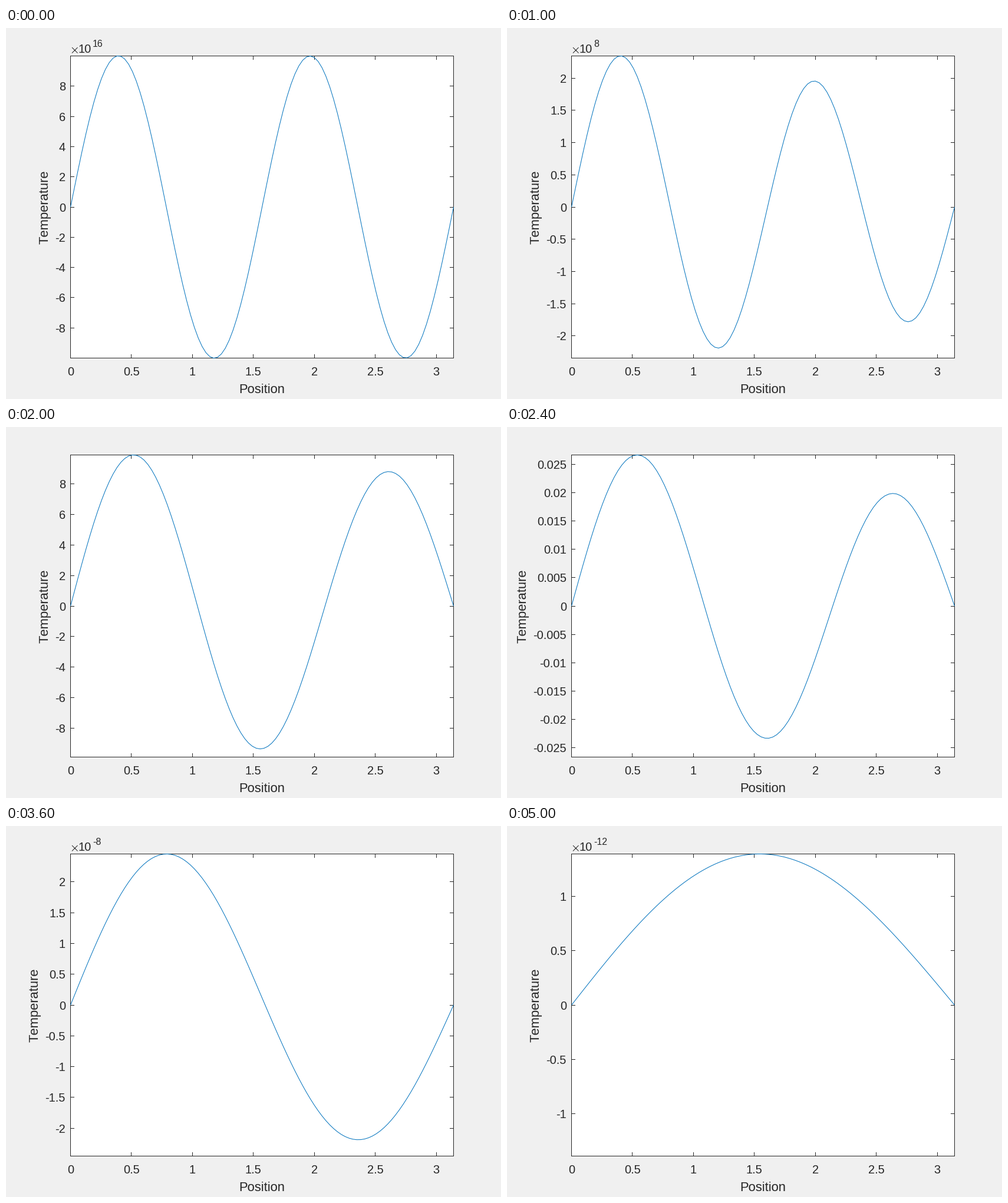
Animation of 840 by 630 pixels, one loop 5100 ms. Source, as a matplotlib script:

```python
import math

import numpy as np
import matplotlib.pyplot as plt
from matplotlib.animation import FuncAnimation
from matplotlib.patches import Rectangle

W, H, DPI = 840, 630, 120
FRAMES, INTERVAL = 51, 100
LEFT, RIGHT, TOP, BOTTOM = 109.5, 759.5, 47.5, 560.5
MID = (TOP + BOTTOM) / 2
TICK = 6.5
MAX_TICKS = 11
INK, BLUE, BACK = "#262626", "#0072BD", "#F0F0F0"

# Mode number -> starting amplitude of sin(n x); each decays as exp(-n t)
MODES = {4: 1e17, 3: 1e14, 2: 1e8, 1: 0.1}
POS = np.linspace(0, math.pi, 100)

plt.rcParams["font.family"] = "Liberation Sans"
plt.rcParams["text.kerning_factor"] = 6
plt.rcParams["axes.unicode_minus"] = False

fig = plt.figure(figsize=(W / DPI, H / DPI), dpi=DPI, facecolor=BACK)
ax = fig.add_axes([0, 0, 1, 1])
ax.set_xlim(0, W)
ax.set_ylim(H, 0)
ax.axis("off")


def pt(px):
    return px * 72 / DPI


def label(x, y, text="", size=20, **kw):
    return ax.text(x, y, text, fontsize=pt(size), color=INK,
                   va=kw.pop("va", "baseline"), **kw)


def stroke(xs, ys, color=INK, **kw):
    line, = ax.plot(xs, ys, color=color, lw=pt(1), snap=False,
                    solid_capstyle="butt", **kw)
    return line


def text_width(text, size=20):
    """Advance width in pixels of a number label."""
    return size * sum({".": 0.278, "-": 0.333}.get(c, 0.556) for c in text)


def crisp(v):
    return math.floor(v) + 0.5


def segments(pairs):
    """Join separate (x0, y0, x1, y1) segments into one broken line."""
    xs, ys = [], []
    for x0, y0, x1, y1 in pairs:
        xs += [x0, x1, np.nan]
        ys += [y0, y1, np.nan]
    return xs, ys


def tick_step(limit):
    """Smallest 1-2-5 step that keeps the tick count low."""
    power = math.floor(math.log10(limit)) - 1
    for p in (power, power + 1):
        for m in (1, 2, 5):
            step = m * 10.0 ** p
            if 2 * math.floor(limit / step + 1e-9) + 1 <= MAX_TICKS:
                return step
    return limit


def temperature(t):
    return sum(a * math.exp(-n * t) * np.sin(n * POS) for n, a in MODES.items())


# Fixed parts: plot area, frame, horizontal axis
ax.add_patch(Rectangle((LEFT, TOP), RIGHT - LEFT, BOTTOM - TOP,
                       facecolor="white", edgecolor="none", zorder=0))
stroke([LEFT - .5, RIGHT + .5, np.nan, LEFT - .5, RIGHT + .5],
       [TOP, TOP, np.nan, BOTTOM, BOTTOM])
stroke([LEFT, LEFT, np.nan, RIGHT, RIGHT], [TOP, BOTTOM, np.nan, TOP, BOTTOM])

x_marks = []
for value in np.arange(0, 3.1, 0.5):
    px = LEFT + value / math.pi * (RIGHT - LEFT)
    name = f"{value:g}"
    label(px - text_width(name) / 2, 590, name)
    x = crisp(px)
    x_marks += [(x, TOP, x, TOP + TICK), (x, BOTTOM - TICK, x, BOTTOM)]
stroke(*segments(x_marks))

label((LEFT + RIGHT) / 2, 620, "Position", 22, ha="center")
y_label = label(0, MID, "Temperature", 22, rotation=90,
                rotation_mode="anchor", ha="center")

# Moving parts
y_ticks = stroke([], [])
y_names = [label(0, 0) for _ in range(MAX_TICKS)]
exponent = [
    stroke([112, 121.5, np.nan, 112, 121.5], [33, 42.5, np.nan, 42.5, 33]),
    label(123, 42, "10"),
    label(147, 32, "", 16),
]
curve = stroke(LEFT + POS / math.pi * (RIGHT - LEFT), np.full(POS.size, MID),
               BLUE, zorder=4, clip_on=False)


def draw(i):
    u = temperature(i / 2)
    limit = u.max()
    power = math.floor(math.log10(limit))
    if -3 < power < 4:
        power = 0
    u = u / 10.0 ** power
    limit = u.max()
    scale = (BOTTOM - TOP) / 2 / limit
    curve.set_ydata(MID - u * scale)

    for part in exponent:
        part.set_visible(power != 0)
    exponent[2].set_text(str(power))

    step = tick_step(limit)
    count = math.floor(limit / step + 1e-9)
    marks, widest = [], 0
    for name in y_names:
        name.set_text("")
    for k, name in zip(range(-count, count + 1), y_names):
        py = MID - k * step * scale
        y = crisp(py)
        marks += [(LEFT, y, LEFT + TICK, y), (RIGHT - TICK, y, RIGHT, y)]
        text = f"{round(k * step, 9):g}"
        width = text_width(text)
        widest = max(widest, width)
        name.set_text(text)
        name.set_position((101 - width, py + 7.5))
    y_ticks.set_data(*segments(marks))
    y_label.set_x(89.3 - widest)
    return [curve, y_ticks, y_label, *y_names, *exponent]


anim = FuncAnimation(fig, draw, frames=FRAMES, interval=INTERVAL,
                     init_func=lambda: draw(0), repeat=True, blit=False)
plt.show()
```
